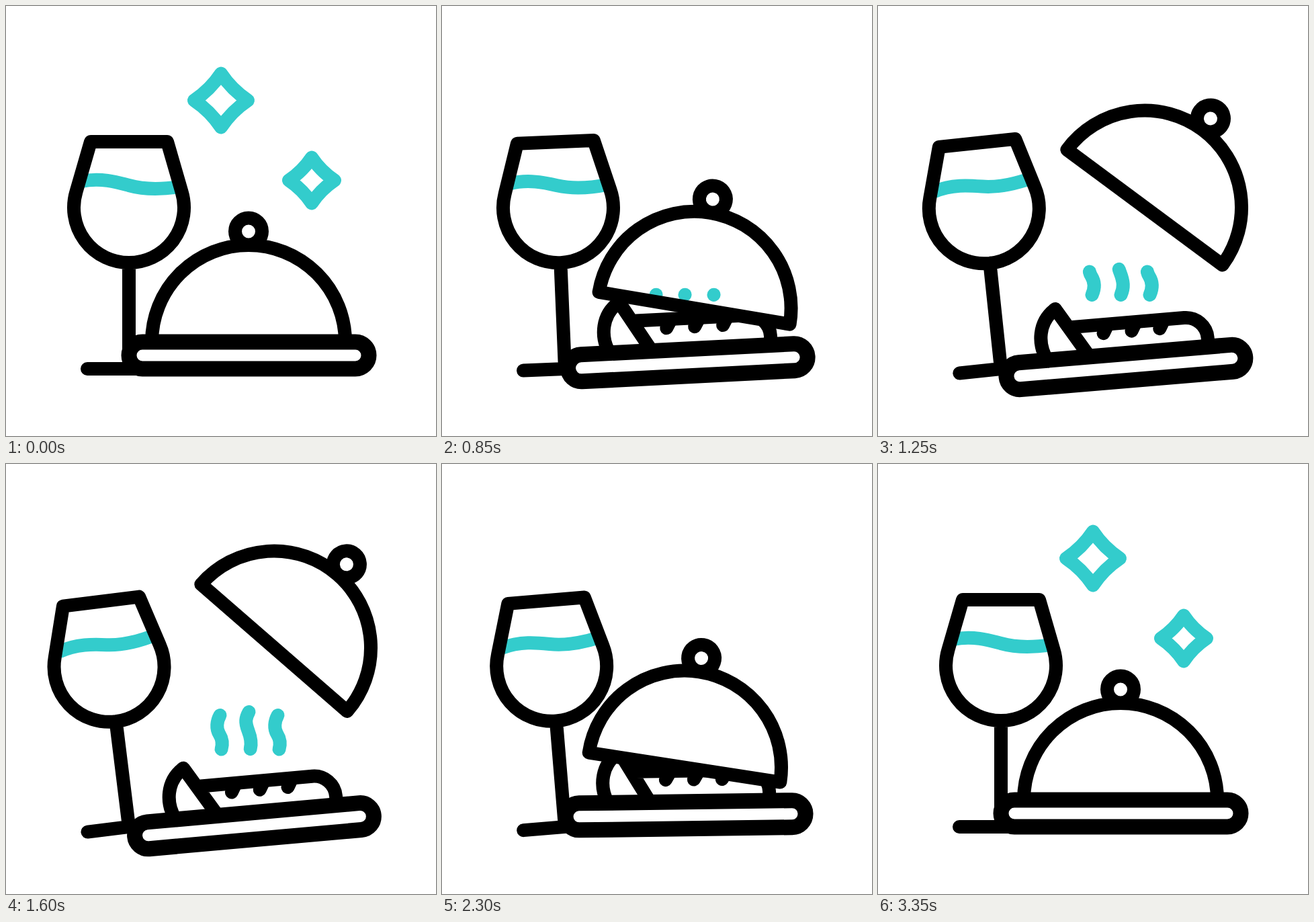
Write an HTML page that moves like this. It is 640 px wide and 640 px high and loops after 3.4 s.

```html
<!DOCTYPE html>
<html lang="en">
<head>
<meta charset="utf-8">
<title>Dinner</title>
<style>
  html, body { margin: 0; width: 100%; height: 100%; overflow: hidden; background: #fff; }
  svg { display: block; width: 100%; height: 100%; fill: none; stroke: #000; stroke-width: 20; stroke-linecap: round; stroke-linejoin: round; }
  .teal { stroke: #33cccc; }
  .white { fill: #fff; }
</style>
</head>
<body>
<svg viewBox="0 0 640 640">
  <path id="star1" class="teal"/>
  <path id="star2" class="teal"/>

  <g id="glass">
    <path id="wine" class="teal" stroke-linecap="butt" d="M112 261C140 255 165 262 183 267S225 274 258 269"/>
    <path d="M126 202H240L261.4 276A82 82 0 1 1 104.6 276ZM183 382V540M121 540H245"/>
  </g>

  <g class="plate">
    <path d="M246 500C233 475 237 442 264 425L309 500M288 454H454A32.5 32.5 0 0 1 486.5 486.5V500"/>
    <path d="M339 456l-6.5 11M381 456l-6.5 11M423 456l-6.5 11"/>
  </g>

  <path class="lid white" stroke="none" d="M217 500A144 144 0 0 1 505 500Z"/>

  <g id="steam" class="teal"></g>

  <g class="lid">
    <circle cx="361" cy="335.5" r="20"/>
    <path d="M217 500A144 144 0 0 1 505 500Z"/>
  </g>

  <rect class="plate white" x="183" y="500" width="357" height="40" rx="20" stroke-width="23"/>
</svg>
<script>
const LOOP = 3400;
const $ = id => document.getElementById(id);
const all = name => document.querySelectorAll(name);

// Ease from 0 to 1; a bias above 1 hurries the beginning, below 1 delays it.
function ease(t, start, length, bias = 1) {
  const s = Math.min(1, Math.max(0, (t - start) / length));
  const x = bias * s / (bias * s + 1 - s);
  return x * x * (3 - 2 * x);
}

// Rise to 1, rest, and return to 0.
const swing = (t, rise, fall) => ease(t, ...rise) - ease(t, ...fall);

function turn(el, angle, x, y, shift = "") {
  el.setAttribute("transform", `${shift}rotate(${angle} ${x} ${y})`);
}

// Stars swell, then vanish; d is the time away from their resting size.
const starScale = d => (1 + .3 * ease(d, 0, 400)) * (1 - ease(d, 400, 340));

function drawStar(el, x, y, size, scale) {
  const r = size * scale, c = r * .4;
  el.setAttribute("d", `M0 ${-r}Q${c} ${-c} ${r} 0Q${c} ${c} 0 ${r}Q${-c} ${c} ${-r} 0Q${-c} ${-c} 0 ${-r}Z`);
  el.setAttribute("transform", `translate(${x} ${y})`);
  el.setAttribute("opacity", Math.min(1, scale * 1.2));
}

const wisps = [-1, 0, 1].map(i => {
  const p = document.createElementNS("http://www.w3.org/2000/svg", "path");
  const x = 361.5 + 43 * i, top = i ? 374 : 369;
  p.setAttribute("d", `M${x} 430C${x + 5} 419 ${x + 4} 410 ${x - 1} ${top + 28}S${x - 5} ${top + 9} ${x} ${top}`);
  p.setAttribute("pathLength", 1);
  return $("steam").appendChild(p);
});

function drawSteam(t) {
  const tail = ease(t, 1500, 520), length = ease(t, 820, 740) - tail;
  $("steam").setAttribute("visibility", length > 0 ? "visible" : "hidden");
  for (const p of wisps) {
    p.setAttribute("stroke-dasharray", `${Math.max(length, .001)} 3`);
    p.setAttribute("stroke-dashoffset", -tail);
  }
}

function draw(now) {
  const t = now % LOOP;

  turn($("glass"), -7.05 * swing(t, [490, 1060, 1.25], [1700, 1180, .6]), 183, 540);
  turn($("wine"), -6.2 * swing(t, [762, 680], [1800, 900, .37]), 184, 266);

  const tilt = 5.1 * swing(t, [500, 1100, 2.6], [1700, 790]);
  for (const el of all(".plate")) turn(el, -tilt, 575, 440);

  const drop = [1918, 950, 3.5];
  const slide = 38 * swing(t, [590, 830, 1.6], [1918, 400, 3.5]);
  const lift = 226.5 * swing(t, [590, 830, .96], drop);
  const open = 41 * swing(t, [590, 830], drop);
  for (const el of all(".lid")) turn(el, open, 361, 500, `translate(${slide} ${-lift})`);

  drawSteam(t);

  const away = Math.min(t, Math.max(0, LOOP - 230 - t));
  const lag = t < LOOP / 2 ? -60 : 100;
  drawStar($("star1"), 320, 140.5, 40, starScale(away));
  drawStar($("star2"), 455, 259.5, 34, starScale(t > LOOP / 2 ? Math.max(0, LOOP - 230 + lag - t) : t + lag));
}

let start;
function frame(now) {
  start ??= now;
  draw(now - start);
  requestAnimationFrame(frame);
}
draw(0);
requestAnimationFrame(frame);
</script>
</body>
</html>
```
